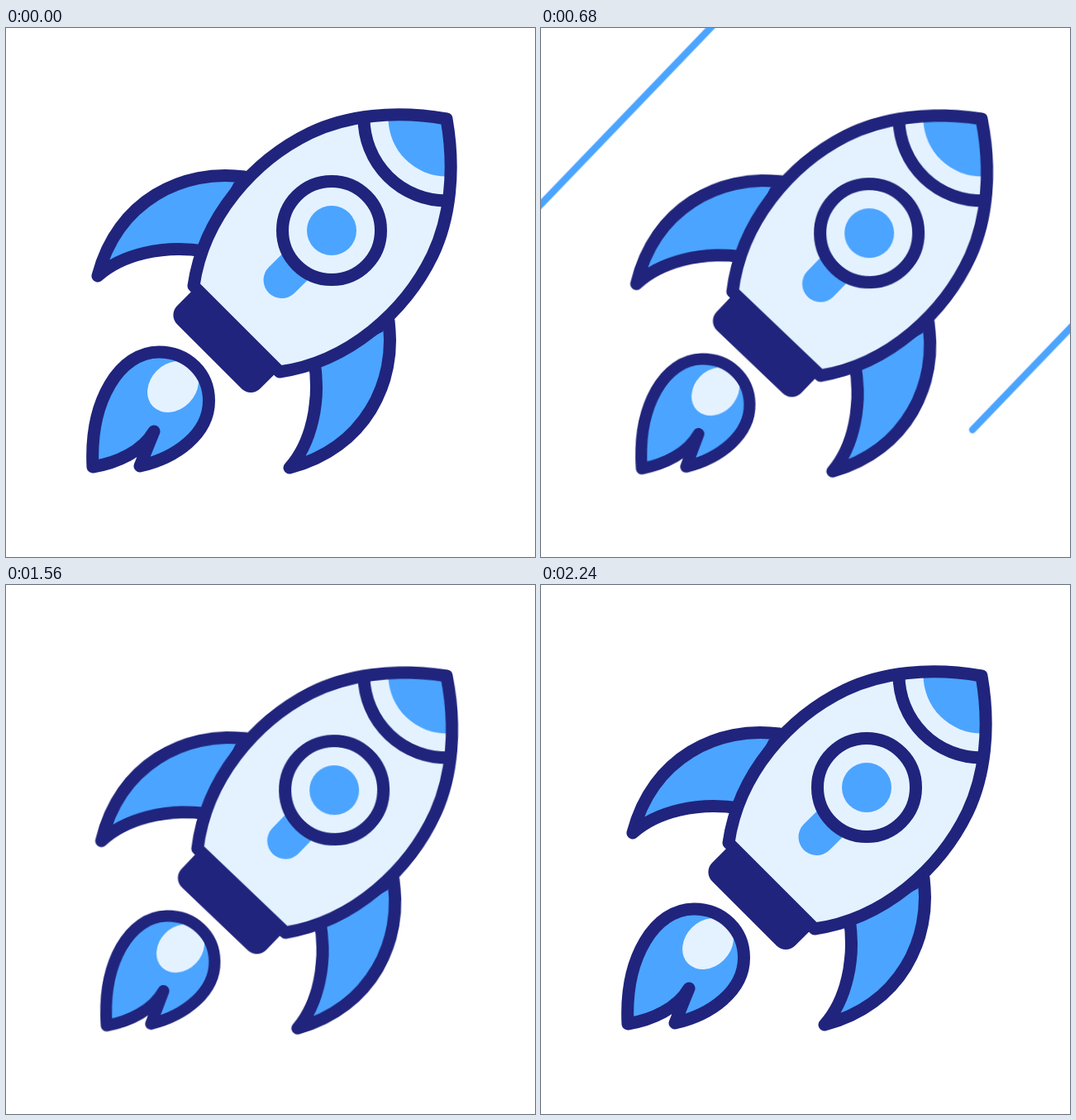
An HTML page that plays this animation: 640x640 px, repeating every 2.28 s.

```html
<!DOCTYPE html>
<html lang="en">
<head>
<meta charset="utf-8">
<title>Rocket</title>
<style>
  html, body { margin: 0; width: 100%; height: 100%; overflow: hidden; background: #fff; }
  svg { display: block; width: 100%; height: 100%; }

  .ink { stroke: #20247c; stroke-width: 15; stroke-linecap: round; stroke-linejoin: round; }
  .navy { fill: #20247c; }
  .blue { fill: #4ba4ff; }
  .pale { fill: #e4f2ff; }
  .none { fill: none; }

  .streaks { stroke: #4ba4ff; stroke-width: 8.5; stroke-linecap: round;
    animation: fly 2280ms steps(57) infinite; }
  .rocket { transform-origin: 534px 109px;
    animation: sway 2280ms cubic-bezier(.333, 0, .667, 1) infinite; }
  .flame { transform-origin: 229px 402px;
    animation: shrink 2280ms cubic-bezier(.333, 0, .667, 1) infinite; }

  @keyframes fly {
    to { transform: translate(-3160px, 3288px); }
  }
  /* motion spans 2240 ms, then rests for 40 ms */
  @keyframes sway {
    0%, 98.25%, 100% { transform: rotate(0deg); }
    49.12% { transform: rotate(-2deg); }
  }
  @keyframes shrink {
    0%, 19.65%, 78.6%, 100% { transform: scale(1); }
    39.3%, 58.95% { transform: scale(.89); }
  }
</style>
</head>
<body>
<svg viewBox="0 0 640 640">
  <defs>
    <path id="streak" d="M0 0L222 -231"/>
    <path id="fin" d="M288 180C215 170 135 208 111 300C140 274 190 262 240 270Z"/>
    <path id="hull" d="M227 312C239 228 300 160 368 127C412 106 470 99 533 110
      C544 173 537 231 516 275C483 343 415 404 331 416Z"/>
    <path id="fire" d="M105 531C101 450 138 392 185 392C220 392 245.5 418 245.5 451
      C245.5 491 206 520 162 530L179 488C165 512 135 526 105 531Z"/>
    <clipPath id="inHull"><use href="#hull"/></clipPath>
    <clipPath id="inFire"><use href="#fire"/></clipPath>
  </defs>

  <g class="streaks">
    <!-- upper left -->
    <use href="#streak" x="609" y="-334.4"/>
    <use href="#streak" x="932.5" y="-757.1"/>
    <use href="#streak" x="1584" y="-1500.7"/>
    <use href="#streak" x="2398" y="-2346.9"/>
    <!-- lower right -->
    <use href="#streak" x="655.5" y="347.6"/>
    <use href="#streak" x="1464.5" y="-494.6"/>
    <use href="#streak" x="1703.4" y="-653.7"/>
    <use href="#streak" x="2423" y="-1327.1"/>
  </g>

  <g class="rocket">
    <g class="flame">
      <use href="#fire" class="blue"/>
      <g clip-path="url(#inFire)">
        <ellipse class="pale" rx="34" ry="27.5" transform="translate(202 434) rotate(-45)"/>
      </g>
      <use href="#fire" class="ink none"/>
    </g>

    <use href="#fin" class="blue ink"/>
    <use href="#fin" class="blue ink" transform="matrix(0 -1 -1 0 643 643)"/>
    <path class="navy" transform="translate(229 314) rotate(45)"
      d="M0 0H142V31a16 16 0 0 1-16 16H16a16 16 0 0 1-16-16Z"/>

    <use href="#hull" class="pale"/>
    <g clip-path="url(#inHull)">
      <circle class="blue" cx="533" cy="109" r="70.5"/>
      <circle class="ink none" cx="533" cy="109" r="100"/>
    </g>
    <use href="#hull" class="ink none"/>

    <path d="M333.5 305L375 264" stroke="#4ba4ff" stroke-width="44" stroke-linecap="round"/>
    <circle class="pale ink" cx="394" cy="245" r="59.5"/>
    <circle class="blue" cx="394" cy="245" r="30"/>
  </g>
</svg>
</body>
</html>
```
